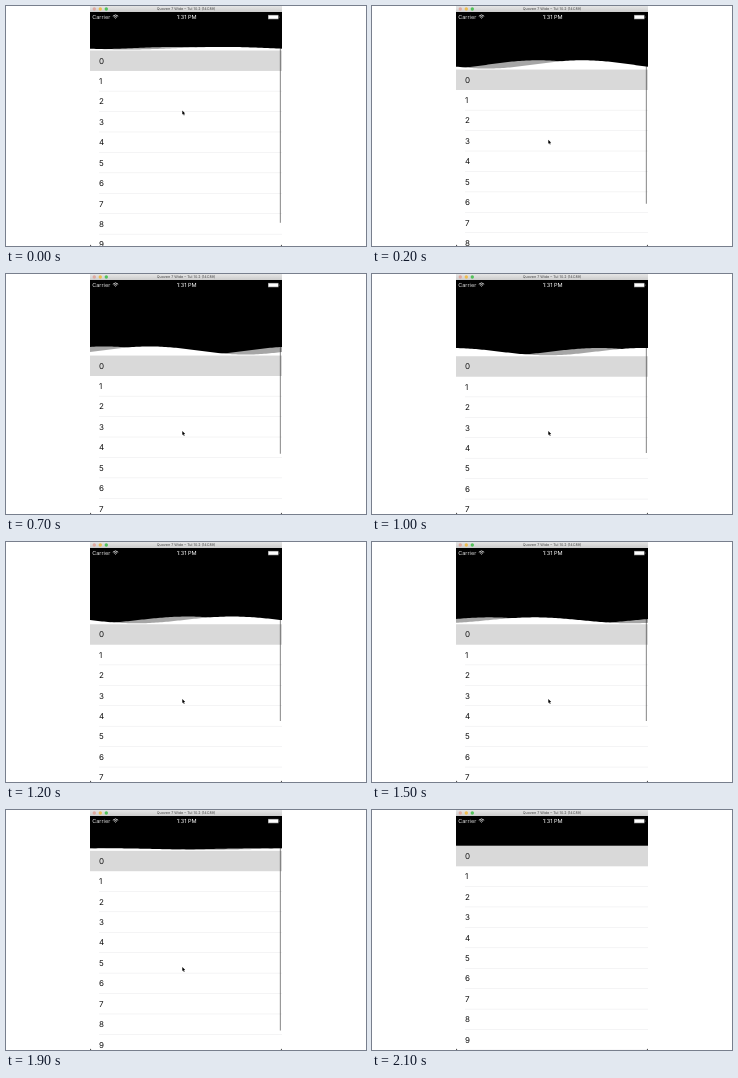
Recreate the animation shown at these times as an HTML page with a canvas. Size 360x240 px, loop 2.4 s.

```html
<!DOCTYPE html>
<html lang="en">
<head>
<meta charset="utf-8">
<title>Wave pull</title>
<style>
html, body { margin: 0; width: 100%; height: 100%; overflow: hidden; background: #fff; }
canvas { display: block; }
</style>
</head>
<body>
<canvas id="stage" width="360" height="240"></canvas>
<script>
const ctx = document.getElementById('stage').getContext('2d');
const LEFT = 84, WIDTH = 192, RIGHT = LEFT + WIDTH;
const REST = 35.9, ROW = 20.43, PULL = 46.4;
const LOOP = 2400, STEP = 100, RELEASE = 15, LAST = 21;

// Motion, as functions of the step number s
const easeOut = (u, power) => 1 - Math.max(0, 1 - u) ** power;

function pullAt(s) {
  return s <= RELEASE
    ? PULL * easeOut((s + 0.68) / 10.28, 3)
    : PULL * (1 - easeOut((s - RELEASE) / 5, 1.4));
}

const waveHeight = (s, pull) => Math.min(pull * 0.3, 10 - 0.27 * s);
const wavePeak = s => 217 - 160 * (1 - Math.cos(Math.PI * s / 22));
const cursorY = s => 104.5 + 52.5 * easeOut(s / 6, 2);

function rect(color, x, y, w, h) {
  ctx.fillStyle = color;
  ctx.fillRect(x, y, w, h);
}

function text(str, x, y, size, color, align = 'left') {
  ctx.font = `${size}px Inter, "Liberation Sans", sans-serif`;
  ctx.textRendering = 'geometricPrecision';
  ctx.textAlign = align;
  ctx.fillStyle = color;
  ctx.fillText(str, x, y);
}

function shape(color, points) {
  ctx.fillStyle = color;
  ctx.beginPath();
  points.forEach(([x, y]) => ctx.lineTo(x, y));
  ctx.fill();
}

function drawTitleBar() {
  const shade = ctx.createLinearGradient(0, 0, 0, 6);
  shade.addColorStop(0, '#e6e6e6');
  shade.addColorStop(1, '#cccccc');
  rect(shade, LEFT, 0, WIDTH, 6);
  ['#dfa9a0', '#eebc4e', '#52c25a'].forEach((color, i) => {
    ctx.fillStyle = color;
    ctx.beginPath();
    ctx.arc(88.3 + 6 * i, 3, 1.7, 0, 7);
    ctx.fill();
  });
  text('Quoven 7 Wide – Tul 10.2 (14C89)', 180, 4.3, 3.7, '#444', 'center');
}

function drawStatusBar() {
  text('Carrier', 86.2, 13.3, 5.5, '#ddd');
  text('1:31 PM', 180.7, 13.3, 5.6, '#fff', 'center');
  ctx.strokeStyle = '#ddd';
  ctx.lineWidth = 0.9;
  for (const r of [0.6, 2.2, 3.8]) {
    ctx.beginPath();
    ctx.arc(109.5, 12.9, r, -Math.PI * 0.75, -Math.PI * 0.25);
    ctx.stroke();
  }
  rect('#888', 262, 8.9, 10.6, 4.4);
  rect('#fff', 262.6, 9.5, 9.4, 3.2);
  rect('#aaa', 272.7, 10.4, 0.6, 1.4);
}

function drawWave(color, peak, top, height) {
  const points = [[LEFT, top + 0.5]];
  for (let x = LEFT; x <= RIGHT; x += 2) {
    const lift = (1 + Math.cos((x - peak) / WIDTH * 2 * Math.PI)) / 2;
    points.push([x, top - 1 - height * lift]);
  }
  points.push([RIGHT, top + 0.5]);
  shape(color, points);
}

function drawList(top) {
  rect('#fff', LEFT, top, WIDTH, 240 - top);
  rect('#d9d9d9', LEFT, top, WIDTH, ROW);
  for (let i = 0; top + i * ROW < 240; i++) {
    const y = top + i * ROW;
    text(i, 92.9, y + 13, 8, '#111');
    if (i) rect('#e8e8ea', 93, y + ROW - 0.5, RIGHT - 93, 0.5);
  }
}

function drawCursor(x, y) {
  const arrow = [[0, 0], [0, 4], [0.9, 3.3], [1.6, 4.9], [2.3, 4.6], [1.7, 3.1], [2.9, 3]];
  shape('#000', arrow.map(([dx, dy]) => [x + dx, y + dy]));
}

function draw(s) {
  const pull = pullAt(s), top = REST + pull;
  rect('#fff', 0, 0, 360, 240);
  rect('#000', LEFT, 6, WIDTH, top - 6);
  drawTitleBar();
  drawStatusBar();
  if (pull > 0) {
    const height = waveHeight(s, pull), peak = wavePeak(s);
    drawWave('#a6a6a6', peak - 45, top, height);
    drawWave('#fff', peak, top, height);
  }
  drawList(top);
  if (s < LAST) {
    // The scroll bar is translucent, so it only shows over the light areas
    rect('rgba(0,0,0,0.4)', 273.8, REST, 1.2, 189.5 - pull);
    drawCursor(176.3, cursorY(s));
  }
  shape('#333', [[LEFT, 238.6], [LEFT, 240], [LEFT + 1.4, 240]]);
  shape('#333', [[RIGHT, 238.6], [RIGHT, 240], [RIGHT - 1.4, 240]]);
}

function tick() {
  draw(Math.min(LAST, Math.floor(performance.now() % LOOP / STEP)));
  requestAnimationFrame(tick);
}
tick();
</script>
</body>
</html>
```
